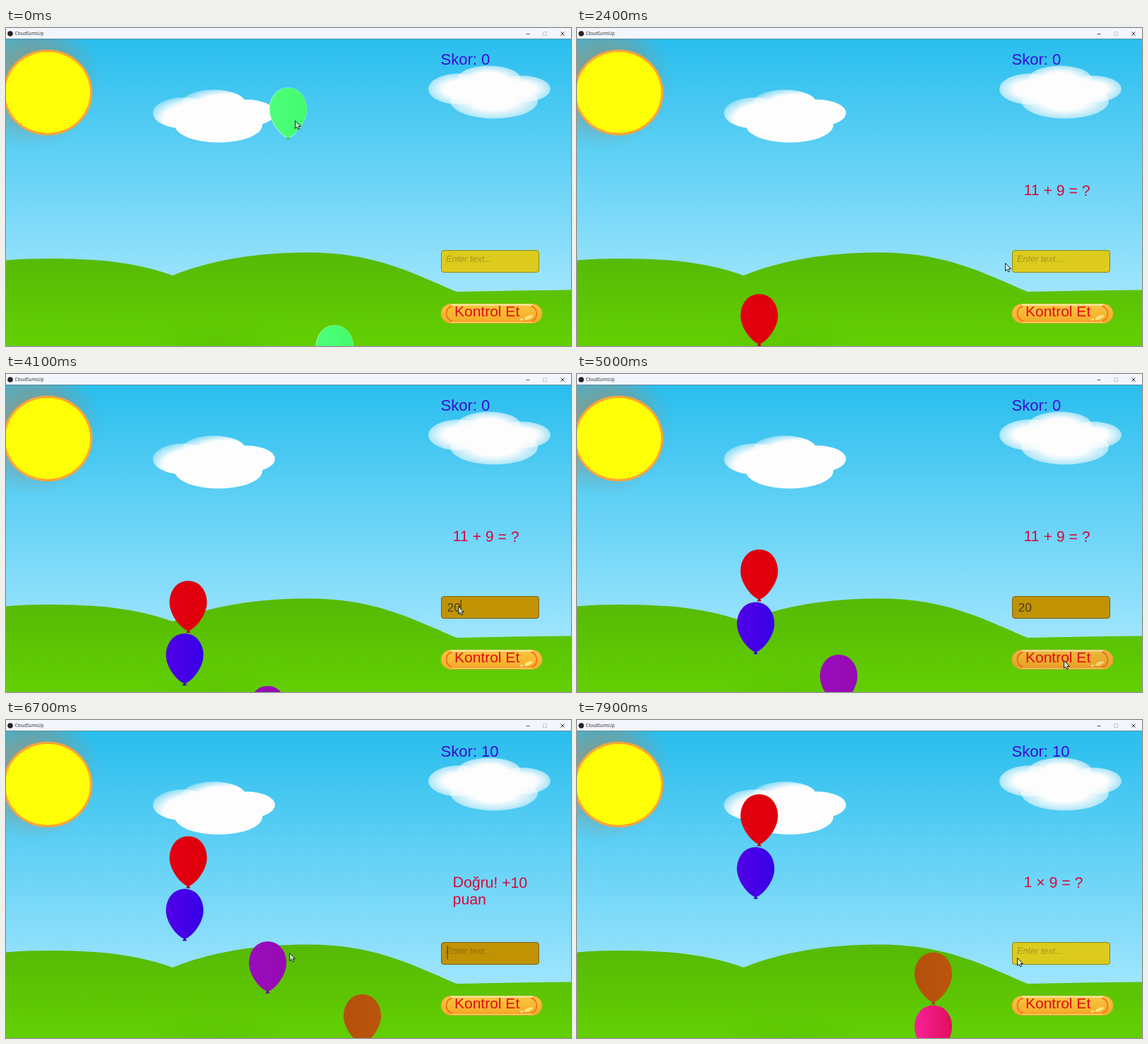
An HTML page with a canvas for the animation above (8 s loop, 800 by 451 pixels).

```html
<!DOCTYPE html>
<html lang="tr">
<head>
<meta charset="utf-8">
<title>CloudSumsUp</title>
<style>
html, body { margin: 0; width: 100%; height: 100%; overflow: hidden; background: #29bfef; }
canvas { display: block; }
</style>
</head>
<body>
<canvas id="stage" width="800" height="451"></canvas>
<script>
const ctx = document.getElementById('stage').getContext('2d');
const LOOP = 8, STEP = 0.1, SPEED = 49.45;
const SANS = '"Liberation Sans", Arial, sans-serif';

// x centre, top at t = 0, left and right colour, time it disappears
const balloons = [
  { x: 399.5, y: 84.7, c: ['#4dff7c', '#42fb6c'], end: 1.9, rim: true },
  { x: 465.5, y: 421.7, c: ['#4dff7c', '#42fb6c'], end: 1.5, rim: true },
  { x: 258, y: 496, c: ['#e00010', '#e0000a'] },
  { x: 253, y: 570.8, c: ['#5200e6', '#3600e8'] },
  { x: 370.5, y: 645.3, c: ['#9a0cbc', '#960ab2'], end: 7 },
  { x: 504.5, y: 720.2, c: ['#b4500c', '#bc540a'] },
  { x: 504.5, y: 795.2, c: ['#f8209a', '#e0105a'] }
];

// time, x, y of the pointer tip
const pointer = [
  [0, 409, 131], [0.3, 409, 131], [1.2, 465, 356], [1.4, 465, 374], [1.6, 465, 374],
  [2.4, 606, 333], [2.8, 640, 329], [4.3, 640, 329], [5, 689, 406], [5.8, 689, 406],
  [6.7, 401, 330], [6.9, 382, 338], [7.1, 382, 338], [7.9, 623, 337], [8, 623, 337]
];

function linear(x0, y0, x1, y1, ...stops) {
  const g = ctx.createLinearGradient(x0, y0, x1, y1);
  stops.forEach((c, i) => g.addColorStop(i / (stops.length - 1), c));
  return g;
}

function text(str, x, y, size, color, opt = {}) {
  ctx.save();
  ctx.translate(x, y);
  ctx.rotate(opt.turn || 0);
  ctx.font = `${opt.style || ''} ${size}px ${opt.family || SANS}`;
  ctx.fillStyle = color;
  ctx.fillText(str, 0, 0);
  ctx.restore();
}

function line(color, width, ...pts) {
  ctx.beginPath();
  for (const [x0, y0, x1, y1] of pts) {
    ctx.moveTo(x0, y0);
    ctx.lineTo(x1, y1);
  }
  ctx.strokeStyle = color;
  ctx.lineWidth = width;
  ctx.stroke();
}

function box(x, y, w, h, r) {
  ctx.beginPath();
  ctx.roundRect(x, y, w, h, r);
}

function oval(x, y, rx, ry, fill, turn = 0) {
  ctx.beginPath();
  ctx.ellipse(x, y, rx, ry, turn, 0, Math.PI * 2);
  ctx.fillStyle = fill;
  ctx.fill();
}

// Ellipse whose white thins out towards its edge
function puff(x, y, rx, ry, dx, dy, solid, edge) {
  ctx.save();
  ctx.translate(x, y);
  ctx.scale(rx, ry);
  const g = ctx.createRadialGradient(dx, dy, 0, dx, dy, 1 + Math.hypot(dx, dy));
  g.addColorStop(0, '#fdfdfd');
  g.addColorStop(solid, '#fdfdfd');
  g.addColorStop(1, `rgba(253,253,253,${edge})`);
  oval(0, 0, 1, 1, g);
  ctx.restore();
}

function cloud(x, y, soft) {
  const d = soft ? 0 : 0.4, s = soft ? 0.5 : 0.66, e = soft ? 0.55 : 0.35;
  puff(x + 43, y + 33, 43, 22, d, d, s, e);
  puff(x + 86, y + 19, 45, 19, d, d, s, e);
  puff(x + 132, y + 33, 41, 19, 0, 0, s, soft ? e : 1);
  puff(x + 93, y + 50, 62, 25, 0, 0, s, soft ? e : 1);
  puff(x + 88, y + 36, 58, 24, 0, 0, 0.6, 0);
}

function sun() {
  const g = ctx.createRadialGradient(36, 74, 30, 36, 74, 100);
  g.addColorStop(0, 'rgba(190,130,70,.55)');
  g.addColorStop(0.45, 'rgba(165,135,100,.36)');
  g.addColorStop(1, 'rgba(120,160,150,0)');
  ctx.fillStyle = g;
  ctx.fillRect(0, 16, 160, 190);
  oval(59, 91.5, 63.3, 60.8, '#ffa636');
  oval(59, 91.5, 60, 57.5, '#ffff08');
}

function hills() {
  ctx.fillStyle = linear(0, 318, 0, 451, '#56b905', '#5cc404', '#63d003');
  ctx.beginPath();
  ctx.moveTo(0, 329.5);
  ctx.bezierCurveTo(40, 326, 85, 326.5, 125, 329);
  ctx.bezierCurveTo(170, 332, 205, 340, 236, 351);
  ctx.bezierCurveTo(290, 329, 355, 318.5, 428, 318.5);
  ctx.bezierCurveTo(522, 318.5, 574, 347, 638, 374);
  ctx.bezierCurveTo(690, 373, 745, 372, 800, 371.5);
  ctx.lineTo(800, 451);
  ctx.lineTo(0, 451);
  ctx.fill();
  ctx.save();
  ctx.translate(300, 456);
  ctx.scale(1, 0.36);
  const g = ctx.createRadialGradient(0, 0, 20, 0, 0, 115);
  g.addColorStop(0, 'rgba(80,180,0,.3)');
  g.addColorStop(1, 'rgba(80,180,0,0)');
  oval(0, 0, 115, 115, g);
  ctx.restore();
}

function balloon(b, y) {
  ctx.save();
  ctx.translate(b.x, y);
  ctx.fillStyle = linear(-26, 0, 26, 0, ...b.c);
  ctx.beginPath();
  ctx.moveTo(0, 0);
  ctx.bezierCurveTo(16, 0, 26.5, 14, 26.5, 31);
  ctx.bezierCurveTo(26.5, 48, 11, 67, 1.5, 70.5);
  ctx.lineTo(-1.5, 70.5);
  ctx.bezierCurveTo(-11, 67, -26.5, 48, -26.5, 31);
  ctx.bezierCurveTo(-26.5, 14, -16, 0, 0, 0);
  ctx.fill();
  if (b.rim) {
    ctx.strokeStyle = linear(-26, 40, 22, 20, 'rgba(225,255,232,.8)', 'rgba(190,255,205,.3)');
    ctx.lineWidth = 1;
    ctx.stroke();
  }
  ctx.beginPath();
  ctx.moveTo(-1, 70);
  ctx.lineTo(1, 70);
  ctx.lineTo(3, 73.7);
  ctx.lineTo(-3, 73.7);
  ctx.fill();
  ctx.fillStyle = 'rgba(0,0,0,.18)';
  ctx.fill();
  ctx.restore();
}

function titleBar() {
  ctx.fillStyle = '#f3f6fc';
  ctx.fillRect(0, 0, 800, 15);
  ctx.fillStyle = '#5f8fa5';
  ctx.fillRect(0, 15, 800, 1);
  oval(6, 8, 3.8, 3.8, '#2a2226');
  text('CloudSumsUp', 12.5, 10.3, 6.2, '#222', { family: '"Open Sans", sans-serif' });
  line('#555', 1, [736.5, 8.5, 741.5, 8.5]);
  ctx.strokeStyle = '#c4c8cc';
  ctx.strokeRect(760.5, 5.5, 5, 5);
  line('#222', 1, [785.5, 5.5, 790.5, 10.5], [790.5, 5.5, 785.5, 10.5]);
}

function field(t) {
  const active = t >= 2.8 && t < 7;
  box(616.5, 315.5, 138, 31, 3.5);
  ctx.fillStyle = active ? '#c19304' : '#dccb1c';
  ctx.fill();
  ctx.strokeStyle = active ? '#7c5c08' : '#8f861a';
  ctx.lineWidth = 1;
  ctx.stroke();
  const typed = t >= 5.1 || t < 3.3 ? '' : t < 3.6 ? '2' : '20';
  if (typed) text(typed, 624.5, 336.5, 17.4, '#4a3a10');
  else text('Enter text...', 623, 331.5, 12.7, active ? '#8f6c08' : '#a3961a', { style: 'italic', turn: 0.006 });
  if (active && (t - 2.8 + 1.16) % 1.18 < 0.59) {
    const x = 625 + typed.length * 9.6;
    line('#3a3010', 1, [x, 320, x, 339.5]);
  }
}

function button(t) {
  const hover = t >= 4.9 && t < 6;
  box(616, 391.5, 143, 27, 13.5);
  ctx.fillStyle = linear(0, 391, 0, 419, '#fbc544', '#f8b832', '#f6a82a');
  ctx.fill();
  ctx.strokeStyle = '#f0a638';
  ctx.lineWidth = 1;
  ctx.stroke();
  line('#fdf0b0', 1.8, [630, 392.5, 745, 392.5]);
  line('#fbd878', 1.2, [630, 417.5, 745, 417.5]);
  ctx.strokeStyle = '#ef6a1c';
  ctx.lineWidth = 1.6;
  ctx.beginPath();
  ctx.ellipse(633, 405, 9.5, 10.5, 0, Math.PI * 0.55, Math.PI * 1.45);
  ctx.stroke();
  ctx.beginPath();
  ctx.ellipse(742, 405, 9.5, 10.5, 0, -Math.PI * 0.45, Math.PI * 0.45);
  ctx.stroke();
  line('#f39a28', 1, [632, 415.5, 742, 415.5]);
  oval(740, 410.5, 6.5, 2.4, '#ffe680', -0.4);
  oval(730, 413.5, 2.4, 1.3, '#ffe680', -0.3);
  if (hover) {
    box(616, 391.5, 143, 27, 13.5);
    ctx.fillStyle = 'rgba(90,60,20,.09)';
    ctx.fill();
  }
  text('Kontrol Et', 635, 409, 21, '#e00c10');
}

function message(t) {
  const put = (s, y) => text(s, 632.6, y, 21.2, '#d8063c', { turn: 0.012 });
  if (t >= 7) put('1 × 9 = ?', 237);
  else if (t >= 5.1) {
    put('Doğru! +10', 237);
    put('puan', 261);
  } else if (t >= 1.5) put('11 + 9 = ?', 237);
}

function cursor(t) {
  const i = Math.max(1, pointer.findIndex(p => p[0] > t));
  const [t0, x0, y0] = pointer[i - 1], [t1, x1, y1] = pointer[i];
  const u = (t - t0) / (t1 - t0), k = u * u * (3 - 2 * u);
  ctx.save();
  ctx.translate(x0 + (x1 - x0) * k + 0.5, y0 + (y1 - y0) * k + 0.5);
  ctx.beginPath();
  ctx.moveTo(0, 0);
  for (const [x, y] of [[0, 11], [2.5, 8.8], [4.3, 12.5], [6.2, 11.5], [4.6, 8], [8, 8]]) ctx.lineTo(x, y);
  ctx.closePath();
  ctx.fillStyle = 'rgba(225,242,235,.75)';
  ctx.fill();
  ctx.strokeStyle = '#1c2a2c';
  ctx.lineWidth = 1;
  ctx.stroke();
  ctx.restore();
}

function draw(t) {
  ctx.fillStyle = linear(0, 16, 0, 375, '#29beee', '#9fe5fd');
  ctx.fillRect(0, 0, 800, 451);
  sun();
  cloud(208, 87.5, false);
  cloud(598, 53.5, true);
  hills();
  for (const b of balloons) {
    const y = b.y - SPEED * t;
    if (y < 451 && !(t >= b.end)) balloon(b, y);
  }
  text('Skor: ' + (t >= 5.1 ? 10 : 0), 615.5, 52, 22, '#3a0cd2');
  message(t);
  field(t);
  button(t);
  titleBar();
  cursor(t);
}

const start = performance.now();
function frame() {
  const t = ((performance.now() - start) / 1000) % LOOP;
  draw(Math.floor(t / STEP + 1e-6) * STEP + 1e-6);
  requestAnimationFrame(frame);
}
frame();
</script>
</body>
</html>
```
